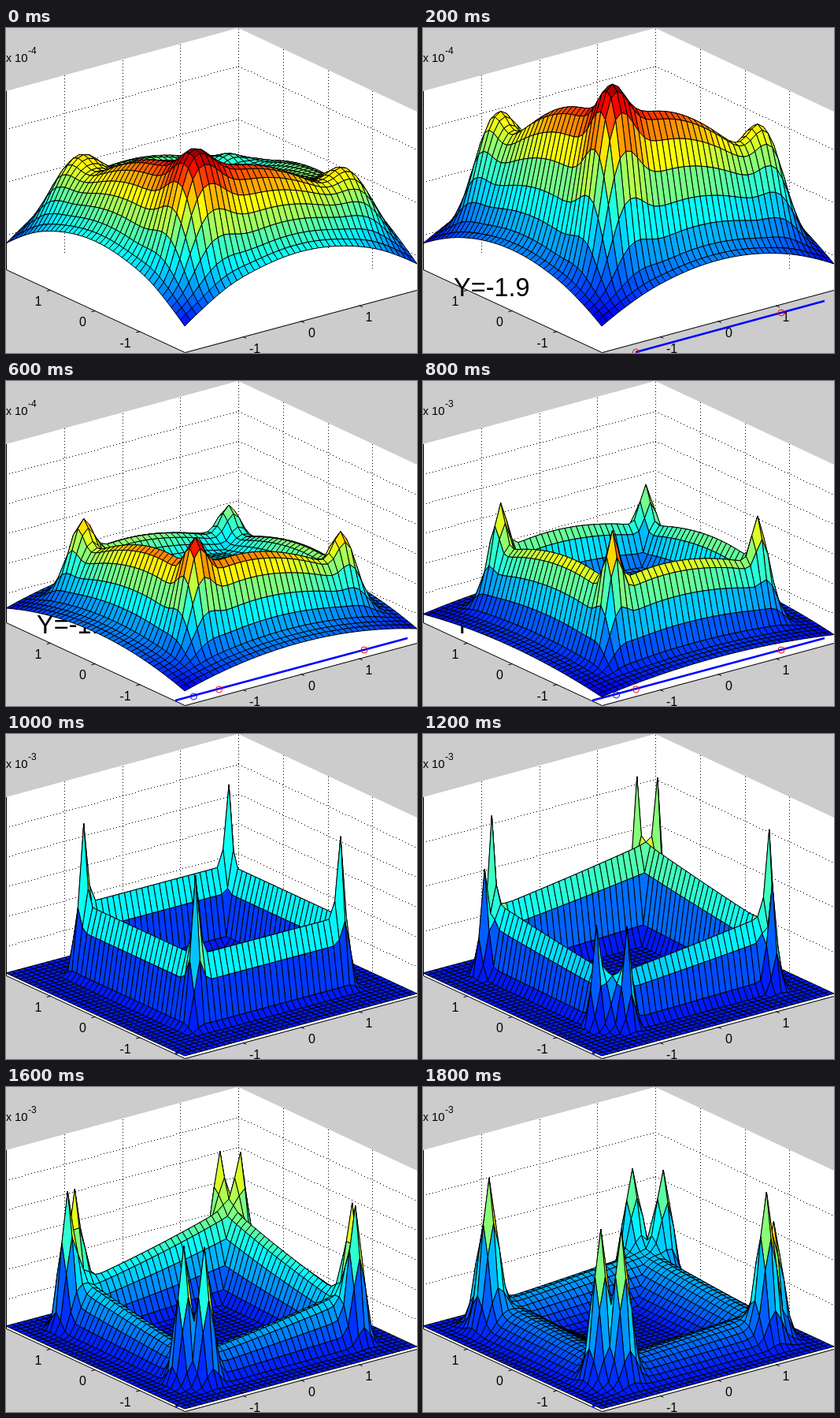
An HTML page with a canvas for the animation above (2000 ms loop, 522 by 412 pixels).

```html
<!DOCTYPE html>
<html lang="en">
<head>
<meta charset="utf-8">
<title>Field surface</title>
<style>
html, body { margin: 0; width: 100%; height: 100%; overflow: hidden; background: #ccc; }
canvas { display: block; width: 522px; height: 412px; }
</style>
</head>
<body>
<canvas id="stage" width="522" height="412"></canvas>
<script>
const ctx = document.getElementById('stage').getContext('2d');
const HOLD = 200, STEPS = 10, N = 40, HALF = 1.25, SHIFT = 0.05;
const TOPS = [221, 303, 209, 176, 185, 195];

const clamp = v => Math.max(0, Math.min(1, v));
const ease = t => Math.cos(clamp(t) * Math.PI / 2) ** 2;
const snap = v => Math.round(v * 10) / 10;
const project = (x, y, h = 0) =>
  [261 + 73.75 * x - 56.75 * y, 319 - 19.75 * x - 26.25 * y - h];

// Single corner peaks on the way in, split pairs on the way out.
function peaksAt(n, top, side, r) {
  if (n <= 5) return [[-1.2, -1.2, top], [-1.2, 1.3, side], [1.3, 1.3, side * side / top]];
  return [
    [-1.4, snap(-1.08 - .1 * r), 112 + 86 * r],
    [snap(-1.14 - .14 * r), 1.5, Math.min(200, 237 - 84 * r)],
    [-1.4, snap(1.48 - .16 * r), 119 + 78 * r],
    [1.3, snap(1.42 + .16 * r), Math.min(200, 246 - 98 * r)]
  ];
}

// q: remaining distance before the plane is reached, r: distance after it.
function poseAt(n) {
  const q = clamp(1 - n / 5), r = clamp((n - 5) / 4);
  const top = TOPS[Math.min(n, 5)], far = Math.min(1, 4 * q);
  const side = top * (1 - .33 * Math.sqrt(Math.min(1, 1.3 * q)));
  const near = (1 - q) ** 4;
  return {
    rim: 3 + 30 * Math.min(1, 1.25 * q),
    dome: 55 * q,
    wall: top * (.48 + .15 * far) - 58 * r * r,
    tilt: 1 + .6 * Math.min(1, 2 * q) - .45 * Math.sin(2.4 * r),
    arch: .2 * far,
    pit: .75 * q,
    inner: .25 + .4 * q + .55 * r * r,
    outer: .25 + .5 * Math.sqrt(q) + .4 * r * r,
    tip: .08 + .3 * q + .08 * r,
    bias: 38 * near,
    span: top + 78 * near,
    peaks: peaksAt(n, top, side, r)
  };
}

function height(p, x, y) {
  const u = Math.abs(x - SHIFT), v = Math.abs(y - SHIFT);
  const far = Math.max(u, v), near = Math.min(u, v, HALF);
  const edge = Math.max(Math.abs(x), Math.abs(y)) / 2;
  const lean = p.tilt ** (-(x + y) / (2 * HALF) * (1 - edge ** 4) / .85);
  const dome = p.rim + p.dome * (2 - (x * x + y * y) / 4);
  const wall = p.wall * lean * (1 - p.arch * (near / HALF) ** 2);
  const ring = p.pit + (1 - p.pit) * ease((HALF - far) / p.inner);
  const fall = ease((u - HALF) / p.outer) * ease((v - HALF) / p.outer);
  const base = dome + (wall - dome) * ring * fall;
  let lift = 0;
  for (const [a, b, top] of p.peaks) {
    const d = Math.min(Math.hypot(x - a, y - b), Math.hypot(x - b, y - a));
    lift = Math.max(lift, (top - base) * Math.exp(-((d / p.tip) ** 2)));
  }
  return base + lift;
}

const jet = t => 'rgb(' + [3, 2, 1].map(c =>
  Math.round(255 * clamp(1.5 - Math.abs(4 * clamp(t) - c)))).join() + ')';

function path(points, close) {
  ctx.beginPath();
  points.forEach(([x, y]) => ctx.lineTo(x, y));
  if (close) ctx.closePath();
}
function stroke(points, color = '#000', width = 1) {
  path(points);
  ctx.strokeStyle = color;
  ctx.lineWidth = width;
  ctx.stroke();
}
function dots([ax, ay], [bx, by]) {
  const count = Math.max(Math.abs(bx - ax), Math.abs(by - ay)) / 4;
  ctx.fillStyle = '#000';
  for (let i = 0; i <= count; i++)
    ctx.fillRect(Math.round(ax + (bx - ax) * i / count),
      Math.round(ay + (by - ay) * i / count), 1, 1);
}
function circle(x, y, color) {
  ctx.beginPath();
  ctx.arc(x, y, 4, 0, 7);
  ctx.strokeStyle = color;
  ctx.lineWidth = 1;
  ctx.stroke();
}
function label(text, x, y, size) {
  ctx.font = size + 'px "Liberation Sans", Arial, sans-serif';
  ctx.fillStyle = '#000';
  ctx.fillText(text, x, y);
}

function drawAxes(n) {
  ctx.fillStyle = '#ccc';
  ctx.fillRect(0, 0, 522, 412);
  path([[0, 80], [295, 0], [522, 106], [522, 332], [227, 411], [0, 306]], true);
  ctx.fillStyle = '#fff';
  ctx.fill();

  for (const t of [-1, 0, 1, 2]) {
    dots(project(t, 2, 226), project(t, 2));
    if (t < 2) dots(project(2, t, 226), project(2, t));
  }
  const [first, step] = n < 2 ? [128, 67] : n === 2 ? [93, 37.5]
    : n % 3 ? [118, 37.7] : n > 3 ? [137, 56.5] : [118, 37.7];
  for (let y = first; y < 304; y += step) {
    dots([0, y], [295, y - 80]);
    dots([295, y - 80], [522, y + 26]);
  }

  stroke([[.5, 80], [.5, 306.5], [227.5, 411.5], [522, 332.5]]);
  for (const t of [-1, 0, 1]) {
    const [a, b] = project(t, -2), [c, d] = project(-2, t);
    stroke([[a, b], [a + 4.5, b + 2]]);
    stroke([[c, d], [c - 5, d + 1.3]]);
    const minus = t < 0 ? 5 : 0;
    label(t, 384 + 72.5 * t - minus / 2, 392 - 20 * t, 16);
    label(t, 93 - 56.5 * t - minus, 378 - 26.5 * t, 16);
  }
  label('x', 0, 43, 14);
  label('10', 11, 43, 15);
  label(n < 4 ? '-4' : '-3', 28, 33, 12);
}

function drawNotes(n) {
  if (!n) return;
  const drop = n === 1 ? 20 : 0;
  label('Y=-' + (2 - n / 10).toFixed(1), 39, 320 + drop, 32.5);
  stroke([drop ? [270, 411] : [215, 405], [510, 326 + drop]], '#00f', 2.5);
  circle(270.5, 391 + drop, '#f00');
  circle(455, 341 + drop, '#f00');
  if (n > 1) circle(231 + 7.3 * (n - 2), 402 - 2 * (n - 2), '#00f');
}

function drawSurface(n) {
  const p = poseAt(n), at = i => (i - N / 2) / 10;
  const z = Array.from({ length: N + 1 }, (_, i) =>
    Array.from({ length: N + 1 }, (_, j) => height(p, at(i), at(j))));
  const point = (i, j) => project(at(i), at(j), z[i][j]);
  ctx.lineJoin = 'round';
  for (let i = N - 1; i >= 0; i--) {
    for (let j = N - 1; j >= 0; j--) {
      path([point(i, j), point(i + 1, j), point(i + 1, j + 1), point(i, j + 1)], true);
      ctx.fillStyle = jet((z[i][j] + p.bias) / p.span);
      ctx.fill();
      ctx.strokeStyle = '#000';
      ctx.lineWidth = 1;
      ctx.stroke();
    }
  }
}

let shown = -1;
function tick() {
  const n = Math.floor(performance.now() / HOLD) % STEPS;
  if (n !== shown) {
    shown = n;
    drawAxes(n);
    drawNotes(n);
    drawSurface(n);
  }
  requestAnimationFrame(tick);
}
tick();
</script>
</body>
</html>
```
